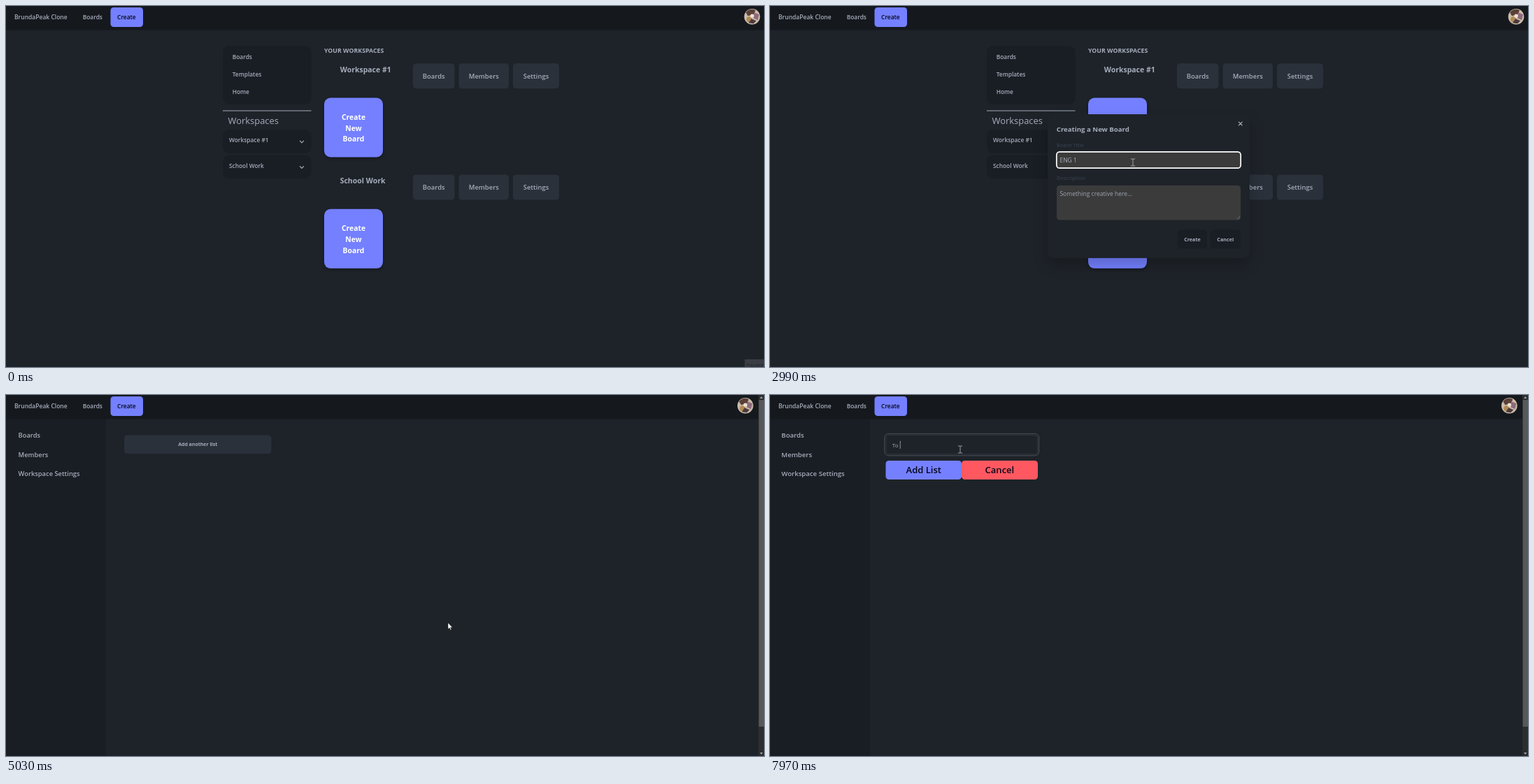
An HTML page that plays this animation: 1084 by 517 pixels, repeating every 8000 ms.

```html
<!DOCTYPE html>
<html lang="en">
<head>
<meta charset="utf-8">
<title>Board demo</title>
<style>
  html, body { margin: 0; width: 100%; height: 100%; overflow: hidden; background: #1e2329; }
  svg { display: block; width: 1084px; height: 517px; }
  text { font-family: "Open Sans", "Noto Sans", sans-serif; white-space: pre; }
  .card { filter: drop-shadow(0 2px 2px #0005); }
  .sheet { filter: drop-shadow(0 10px 10px #0003); }
</style>
</head>
<body>
<svg id="stage" viewBox="0 0 1084 517"></svg>
<script>
const LOOP = 8000;
const C = {
  base: '#1e2329', panel: '#191e24', bar: '#15191e', neutral: '#2a313b', hover: '#232a33',
  text: '#a6adbb', primary: '#7480ff', primaryHover: '#6873e6', error: '#ff5861',
  ink: '#050617', field: '#3b3b3b', hint: '#9ca3af', label: '#343d4a'
};

// Markup helpers; text is placed by the middle of its capitals.
const rect = (x, y, x2, y2, fill, r = 0, more = '') =>
  `<rect x="${x}" y="${y}" width="${x2 - x}" height="${y2 - y}" rx="${r}" fill="${fill}" ${more}/>`;
const text = (x, y, size, str, { fill = C.text, weight = 600, mid = false, id = '' } = {}) =>
  `<text x="${x}" y="${(y + size * 0.357).toFixed(2)}" font-size="${size}" font-weight="${weight}" fill="${fill}"` +
  `${mid ? ' text-anchor="middle"' : ''}${id ? ` id="${id}"` : ''}>${str}</text>`;
const group = (id, body, more = '') => `<g id="${id}" ${more}>${body}</g>`;
const stroke = (d, color, width) =>
  `<path d="${d}" fill="none" stroke="${color}" stroke-width="${width}" stroke-linecap="round" stroke-linejoin="round"/>`;

const navbar =
  rect(0, 0, 1084, 34.5, C.bar) +
  text(12, 16, 8.5, 'BrundaPeak Clone') +
  text(109.7, 16, 8.4, 'Boards') +
  rect(149.5, 2, 196, 30, C.primary, 4.5) +
  text(172.4, 16, 8.4, 'Create', { fill: C.ink, mid: true });

const avatar = group('avatar',
  `<circle r="11.3" fill="#cbbba8"/>
   <path d="M-9 -6Q-3 -13 5 -9L2 -3L-6 -1Z" fill="#5a4038"/>
   <path d="M3 -6L10 -3L8 5L2 2Z" fill="#8d6a7c"/>
   <circle cx="-4" cy="4" r="4" fill="#b08a55"/>
   <path d="M-1 3L6 6L2 10L-5 9Z" fill="#4b3a3d"/>
   <circle cx="0" cy="-1" r="2.6" fill="#eee2d2"/>`);

function workspaceRow(top, name, id) {
  const tabs = [[582, 641.5, 'Boards'], [647.5, 719, 'Members'], [725, 791, 'Settings']];
  const lines = ['Create', 'New', 'Board'];
  return text(477.7, top + 9, 10.5, name, { weight: 700 }) +
    tabs.map(([a, b, s]) => rect(a, top, b, top + 36, C.neutral, 4.5) +
      text((a + b) / 2, top + 18.3, 9.45, s, { mid: true })).join('') +
    rect(455, top + 49.2, 539, top + 134.2, C.primary, 9, `class="card" id="${id}"`) +
    lines.map((s, i) => text(497, top + 76.6 + i * 15.9, 10.4, s, { fill: '#fff', weight: 700, mid: true })).join('');
}

const sideCard = (y, name) =>
  rect(310, y, 436.5, y + 34, C.panel, 9) + text(319, y + 15.2, 8.35, name) +
  stroke(`M420.4 ${y + 16.2}l2.6 2.6l2.6 -2.6`, C.text, 1.2);

const home = group('home',
  rect(310, 57, 436.5, 141, C.panel, 9) +
  ['Boards', 'Templates', 'Home'].map((s, i) => text(323.7, 73.3 + i * 25, 8.4, s)).join('') +
  rect(310, 149.5, 436.5, 150.5, C.text) +
  text(317.6, 164.8, 12.9, 'Workspaces', { weight: 500 }) +
  sideCard(177, 'Workspace #1') + sideCard(213.5, 'School Work') +
  text(455, 64.3, 8.8, 'YOUR WORKSPACES', { weight: 700 }) +
  workspaceRow(82.3, 'Workspace #1', 'cardA') + workspaceRow(241.6, 'School Work', 'cardB') +
  group('status', rect(1056.5, 506, 1084, 517, '#3a3e44') +
    text(1059, 514.5, 7, 'Paused', { fill: '#20242a', weight: 400 })));

const modal = group('modal',
  rect(397, 155, 686, 361, C.base, 9, 'class="sheet"') +
  stroke('M670.4 166.1l4.8 4.8m0 -4.8l-4.8 4.8', C.text, 1.3) +
  text(409.8, 177, 9.65, 'Creating a New Board', { weight: 700 }) +
  text(410, 199.3, 7.4, 'Board Title', { fill: C.label }) +
  rect(410, 209, 673, 232, C.field, 4.5) +
  rect(409.8, 208.8, 673.2, 232.2, 'none', 4.5, 'id="ring" stroke="#fff" stroke-width="1.7"') +
  text(414.4, 221, 8.55, '', { weight: 400, id: 'title' }) +
  rect(0, 215.3, 0.8, 226, C.text, 0, 'id="titleCaret"') +
  text(410, 246.8, 7.4, 'Description', { fill: C.label }) +
  rect(410, 257, 673, 306.5, C.field, 4.5) +
  text(414.4, 268.5, 8.55, 'Something creative here...', { fill: C.hint, weight: 400 }) +
  stroke('M668 305l3.8 -3.8M670.3 305l1.5 -1.5', '#8a8a8a', 0.6) +
  group('ok', rect(583, 320.5, 625, 347.5, C.panel, 4.5, 'id="okFill"') +
    text(604, 334.2, 7.2, 'Create', { weight: 700, mid: true })) +
  rect(629.5, 320.5, 673, 347.5, C.panel, 4.5) +
  text(651.2, 334.2, 7.2, 'Cancel', { weight: 700, mid: true }));

const LINK_Y = 58, LINK_STEP = 27.3;
const board = group('board',
  rect(0, 34.5, 143, 517, C.panel) +
  ['Boards', 'Members', 'Workspace Settings']
    .map((s, i) => group('link' + i, text(16.3, LINK_Y + i * LINK_STEP, 9.6, s))).join('') +
  group('addList', rect(166, 57, 382.5, 84.5, C.neutral, 4.5, 'id="addFill"') +
    text(274.2, 71, 7.2, 'Add another list', { weight: 700, mid: true })) +
  group('form',
    rect(166, 57.5, 382.5, 84.7, C.base, 4.5, 'stroke="#3a414a" stroke-width=".7"') +
    rect(163.8, 55.4, 384.6, 86.8, 'none', 6, 'id="formRing" stroke="#4a515b" stroke-width="1"') +
    text(174.8, 71.8, 8, '', { weight: 400, id: 'list' }) +
    rect(0, 65.8, 0.8, 77, C.text, 0, 'id="listCaret"') +
    group('save', rect(165.5, 94, 274, 121, C.primary, 4.5) +
      text(219.7, 107.6, 13, 'Add List', { fill: C.ink, weight: 600, mid: true })) +
    group('drop', rect(274, 94, 383, 121, C.error, 4.5) +
      text(328.4, 107.6, 13, 'Cancel', { fill: C.ink, weight: 600, mid: true }))));

const scrollbar = group('scrollbar',
  rect(1076, 0, 1084, 517, '#2b2d2f') + rect(1076.6, 7, 1084, 475, '#56585a') +
  '<path d="M1078 5l2.2 -3l2.2 3zM1078 512l2.2 3l2.2 -3z" fill="#a0a0a0"/>');

const pointer = group('pointer',
  '<circle id="click" cx="-1" cy="0" r="7" fill="#d0c400" opacity=".8"/>' +
  group('arrow', '<path d="M0 0V9.4L2.2 7.5L3.7 10.7L5.1 10L3.7 7H6.6Z" fill="#fff" stroke="#000" stroke-width=".5"/>') +
  group('hand', '<path d="M-1.2 7V1.2a1.1 1.1 0 0 1 2.2 0V5l4.2 1q1 .4 .8 1.6L5 12H-.6L-4 7.8q.6 -1.6 2.8 -.4z" fill="#fff" stroke="#000" stroke-width=".5"/>') +
  group('beam', stroke('M-2.7 -5H-.8L0 -4.3L.8 -5H2.7M-2.7 5H-.8L0 4.3L.8 5H2.7M0 -4.3V4.3', '#b9bcc2', 0.8)));

document.getElementById('stage').innerHTML =
  rect(0, 0, 1084, 517, C.base) + home + board + navbar + avatar + modal + scrollbar + pointer;

const el = {};
document.querySelectorAll('[id]').forEach(n => el[n.id] = n);

// time, x, y, shape from then on
const PATH = [
  [0, 1092, 525, 'arrow'], [460, 530, 330, 'hand'], [560, 508, 326, 'hand'], [680, 508, 326, 'arrow'],
  [840, 508, 326, 'arrow'], [910, 511, 296, 'beam'], [1050, 519, 224, 'beam'], [3660, 519, 224, 'beam'],
  [3960, 578, 306, 'arrow'], [4140, 613, 337, 'arrow'], [4290, 613, 337, 'arrow'], [4500, 632, 326, 'arrow'],
  [5100, 632, 326, 'arrow'], [5730, 345, 188, 'arrow'], [5930, 292, 122, 'arrow'], [6030, 262, 85, 'hand'],
  [6150, 281.5, 67.5, 'hand'], [6560, 281.5, 67.5, 'beam'], [6800, 272, 78, 'beam']
];
const CLICKS = [[560, 640], [1185, 1250], [4150, 4290], [6420, 6560], [6900, 7040]];
const TITLE_KEYS = [[1185, ''], [1720, 'E'], [1920, 'EN'], [1990, 'ENG'], [2190, 'ENG '], [2460, 'ENG 1'], [3060, 'ENG 10'], [3330, 'ENG 101']];
const LIST_KEYS = [[7030, ''], [7500, 'T'], [7700, 'To'], [7970, 'To ']];

const clamp = v => Math.min(1, Math.max(0, v));
const span = (t, a, b) => clamp((t - a) / (b - a));
const smooth = p => p * p * (3 - 2 * p);
const mix = (a, b, p) => a + (b - a) * p;
const within = (t, a, b) => t >= a && t < b;
const show = (node, on) => node.style.display = on ? '' : 'none';
const scaleAt = (node, x, y, s) =>
  node.setAttribute('transform', `translate(${x} ${y}) scale(${s}) translate(${-x} ${-y})`);

function pop(t, start) {
  return t < start + 100
    ? mix(0.972, 1.02, smooth(span(t, start, start + 100)))
    : mix(1.02, 1, smooth(span(t, start + 100, start + 250)));
}

function typed(t, keys, node, caret, hint, focused) {
  const last = keys.filter(k => k[0] <= t).pop();
  const str = last ? last[1] : '';
  const value = str || hint;
  if (node.textContent !== value) node.textContent = value;
  node.setAttribute('fill', str ? C.text : C.hint);
  show(caret, focused && last && (t - last[0]) % 1060 < 530);
  const width = str ? node.getComputedTextLength() : 0;
  caret.setAttribute('x', +node.getAttribute('x') + width + 0.2);
}

function movePointer(t) {
  let i = PATH.length - 1;
  while (PATH[i][0] > t) i--;
  const a = PATH[i], b = PATH[i + 1] || a;
  const p = smooth(b === a ? 0 : span(t, a[0], b[0]));
  el.pointer.setAttribute('transform', `translate(${mix(a[1], b[1], p)} ${mix(a[2], b[2], p)})`);
  for (const kind of ['arrow', 'hand', 'beam']) show(el[kind], kind === a[3]);
  show(el.click, CLICKS.some(c => within(t, c[0], c[1])));
}

function draw(t) {
  const onBoard = t >= 4970;
  show(el.home, !onBoard);
  show(el.board, onBoard);
  show(el.scrollbar, onBoard);
  show(el.status, t < 70);
  el.avatar.setAttribute('transform', `translate(${onBoard ? 1057.3 : 1067} 15.2)`);
  el.cardB.setAttribute('fill', within(t, 460, 640) ? C.primaryHover : C.primary);

  const open = smooth(span(t, 640, 840)) * (1 - smooth(span(t, 4290, 4520)));
  show(el.modal, open > 0);
  if (open > 0) {
    el.modal.setAttribute('opacity', open);
    scaleAt(el.modal, 541.5, 258, mix(0.9, 1, open));
    const focused = within(t, 1185, 4150);
    show(el.ring, focused);
    typed(t, TITLE_KEYS, el.title, el.titleCaret, 'Enter board title', focused);
    el.okFill.setAttribute('fill', t >= 4060 ? C.bar : C.panel);
    scaleAt(el.ok, 604, 334, within(t, 4150, 4290) ? 0.97 : 1);
  }

  if (onBoard) {
    const enter = pop(t, 5030);
    for (let i = 0; i < 3; i++) scaleAt(el['link' + i], 62, LINK_Y + i * LINK_STEP, enter);
    const form = t >= 6560;
    show(el.addList, !form);
    show(el.form, form);
    scaleAt(el.addList, 274.2, 70.8, t >= 6420 ? 0.97 : enter);
    el.addFill.setAttribute('fill', t >= 6340 ? C.hover : C.neutral);
    if (form) {
      const s = pop(t, 6560);
      scaleAt(el.save, 219.7, 107.5, s);
      scaleAt(el.drop, 328.5, 107.5, s);
      show(el.formRing, t >= 6900);
      typed(t, LIST_KEYS, el.list, el.listCaret, 'List name', t >= 6900);
    }
  }
  movePointer(t);
}

const start = performance.now();
function tick() {
  draw((performance.now() - start) % LOOP);
  requestAnimationFrame(tick);
}
tick();
</script>
</body>
</html>
```
